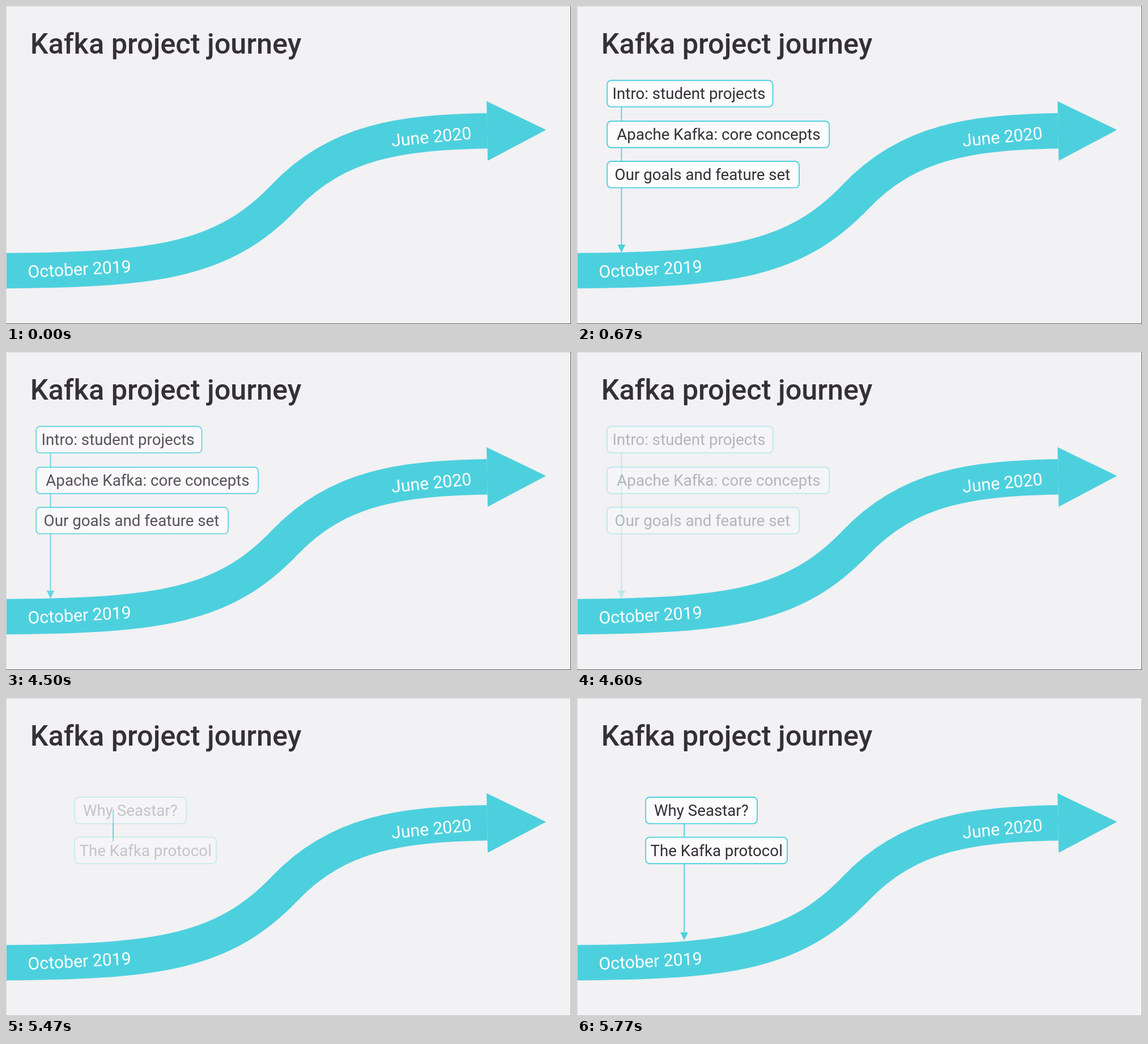
Recreate the animation shown at these times as an HTML page with a canvas. Size 997 by 561 pixels, loop 8000 ms.

```html
<!DOCTYPE html>
<html lang="en">
<head>
<meta charset="utf-8">
<title>Kafka project journey</title>
<style>
  html, body { margin: 0; width: 100%; height: 100%; overflow: hidden; background: #f2f1f3; }
  canvas { display: block; }
</style>
</head>
<body>
<canvas id="stage" width="997" height="561"></canvas>
<script>
const ctx = document.getElementById('stage').getContext('2d');
const W = 997, H = 561, LOOP = 8000;
const BG = '#f2f1f3', CYAN = '#4dd0de', INK = '#333036';
const ITEM_FONT = '27.7px Roboto, sans-serif';
const DATE_FONT = '30.3px Roboto, sans-serif';

const ribbon = new Path2D('M-5 467.1L0 467C270 465 384 449 492 336C586 237 700 223 849 220.3');
const ribbonHead = new Path2D('M848 168L953 218.5L850 273Z');

// Each group: boxes joined by an arrow that grows downwards.
const groups = [
  {
    start: 280, shown: 330, duration: 390, fadeStart: 4465, hideStart: 4495, fadeEnd: 4665,
    arrow: { x: 78.5, top: 155, tip: 435 },
    boxes: [
      { x: 53.2, y: 131.3, w: 292.3, label: 'Intro: student projects', textX: 62.5 },
      { x: 53.2, y: 203.2, w: 392, label: 'Apache Kafka: core concepts', textX: 70.3 },
      { x: 53.2, y: 274, w: 338.8, label: 'Our goals and feature set', textX: 66.6 }
    ]
  },
  {
    start: 5442, shown: 5470, duration: 328, fadeStart: Infinity, hideStart: Infinity, fadeEnd: Infinity,
    arrow: { x: 189.2, top: 197, tip: 427.5 },
    boxes: [
      { x: 121.2, y: 175, w: 196.8, label: 'Why Seastar?', textX: 136 },
      { x: 121.2, y: 245.6, w: 249.8, label: 'The Kafka protocol', textX: 129.5 }
    ]
  }
];
const BOX_H = 46.6;

const clamp = v => Math.min(1, Math.max(0, v));
const easeOut = u => 1 - (1 - u) ** 3;

function text(str, x, y, font, color, degrees = 0) {
  ctx.save();
  ctx.translate(x, y);
  ctx.rotate(degrees * Math.PI / 180);
  ctx.font = font;
  ctx.fillStyle = color;
  ctx.fillText(str, 0, 0);
  ctx.restore();
}

function drawBackground(t) {
  ctx.fillStyle = BG;
  ctx.fillRect(0, 0, W, H);

  ctx.strokeStyle = ctx.fillStyle = CYAN;
  ctx.lineWidth = 62.4;
  ctx.stroke(ribbon);
  ctx.fill(ribbonHead);

  text('Kafka project journey', 42.7, 83.5, '500 50.4px Roboto, sans-serif', INK);
  text('October 2019', 39, 479.5, DATE_FONT, '#fff', -3);
  text('June 2020', 681, 248, DATE_FONT, '#fff', -5.5);

  ctx.fillStyle = '#d9dbdd';
  ctx.fillRect(0, 0, W, 1);
  ctx.fillRect(0, 0, 1, H);
  ctx.fillStyle = t < 5030 ? '#5c5c5e' : '#bcbcbe';
  ctx.fillRect(W - 1, 0, 1, H);
  ctx.fillRect(0, H - 1, W, 1);
}

function drawArrow({ x, top, tip }, end, alpha) {
  ctx.save();
  ctx.beginPath();
  ctx.rect(x - 10, top, 20, end - top);
  ctx.clip();
  ctx.globalAlpha = alpha;
  ctx.fillStyle = CYAN;
  ctx.fillRect(x - 0.9, top, 1.8, tip - 14 - top);
  ctx.beginPath();
  ctx.moveTo(x - 6.8, tip - 14);
  ctx.lineTo(x + 6.8, tip - 14);
  ctx.lineTo(x, tip);
  ctx.fill();
  ctx.restore();
}

function drawBox({ x, y, w, label, textX }, alpha, covered) {
  ctx.beginPath();
  ctx.roundRect(x, y, w, BOX_H, 7);
  if (covered) {
    ctx.fillStyle = BG;
    ctx.fill();
  }
  ctx.globalAlpha = alpha;
  ctx.fillStyle = '#fcfbfd';
  ctx.fill();
  ctx.strokeStyle = CYAN;
  ctx.lineWidth = 1.9;
  ctx.stroke();
  text(label, textX, y + 33.1, ITEM_FONT, INK);
  ctx.globalAlpha = 1;
}

function drawGroup(g, t) {
  if (t < g.shown || t >= g.fadeEnd) return;
  const grow = easeOut(clamp((t - g.start) / g.duration));
  const fading = t >= g.hideStart;
  const fade = fading ? clamp((g.fadeEnd - t) / (g.fadeEnd - g.fadeStart)) : 1;
  const { top, tip } = g.arrow;
  const end = top + (tip - top) * grow;

  drawArrow(g.arrow, end, fade);
  g.boxes.forEach((box, i) => {
    // A box hides the line once the growing end is well past it.
    const passed = end > box.y + BOX_H + 40;
    drawBox(box, grow * fade, passed && (i === 0 || !fading));
  });
}

function frame() {
  const t = performance.now() % LOOP;
  drawBackground(t);
  groups.forEach(g => drawGroup(g, t));
  requestAnimationFrame(frame);
}
frame();
</script>
</body>
</html>
```
